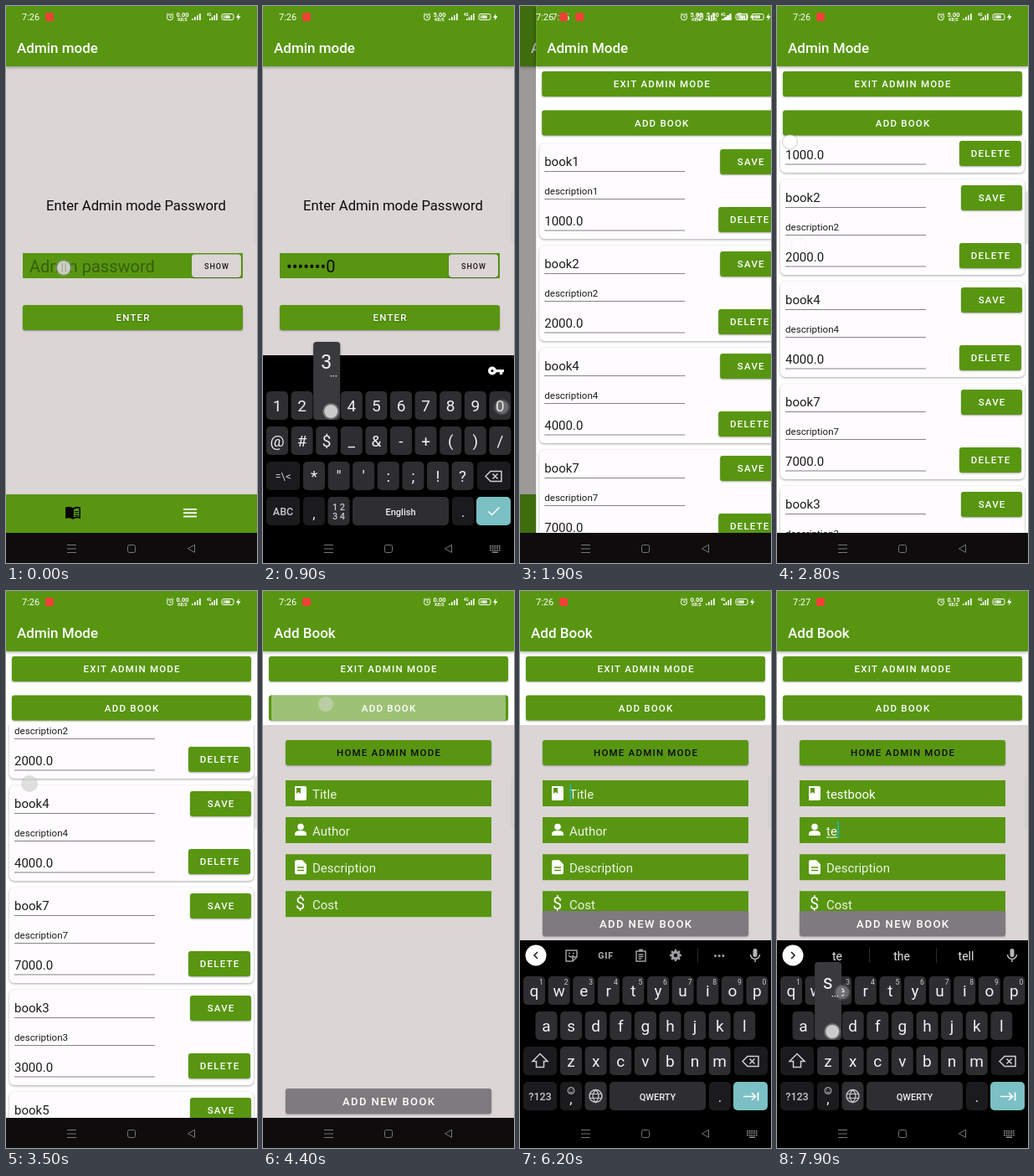
Animation of 300 by 665 pixels, one loop 8000 ms. Source, as an HTML page with a canvas:

```html
<!DOCTYPE html>
<html lang="en">
<head>
<meta charset="utf-8">
<title>Admin app</title>
<style>
html, body { margin: 0; width: 100%; height: 100%; overflow: hidden; background: #000; }
canvas { display: block; width: 300px; height: 665px; }
</style>
</head>
<body>
<canvas id="stage" width="300" height="665"></canvas>
<script>
const c = document.getElementById('stage').getContext('2d');
const LOOP = 8000, GREEN = '#589611', PAPER = '#dbd5d5', KEY = '#2e2e31', DARK = '#1b1b1d', TEAL = '#7ac0c4';
const SECRET = 'admin2003', TITLE = 'testbook', AUTHOR = 'tes';
const clamp = v => Math.max(0, Math.min(1, v));
const easeOut = v => 1 - (1 - clamp(v)) ** 3;

function box(x, y, w, h, fill, r = 0) {
  c.fillStyle = fill;
  c.beginPath();
  c.roundRect(x, y, w, h, r);
  c.fill();
}
function disc(x, y, r, fill) {
  c.fillStyle = fill;
  c.beginPath();
  c.arc(x, y, r, 0, 7);
  c.fill();
}
function ring(x, y, r, color, width = 1) {
  c.strokeStyle = color;
  c.lineWidth = width;
  c.beginPath();
  c.arc(x, y, r, 0, 7);
  c.stroke();
}
function shape(d, color, width = 0, x = 0, y = 0) {
  c.save();
  c.translate(x, y);
  if (width) {
    c.strokeStyle = color;
    c.lineWidth = width;
    c.stroke(new Path2D(d));
  } else {
    c.fillStyle = color;
    c.fill(new Path2D(d), 'evenodd');
  }
  c.restore();
}
function text(s, x, y, size, color, { align = 'left', weight = 400, gap = 0 } = {}) {
  c.font = `${weight} ${size}px Roboto, sans-serif`;
  c.letterSpacing = gap + 'px';
  c.textAlign = align;
  c.fillStyle = color;
  c.fillText(s, x, y);
  return c.measureText(s).width;
}
function shadowed(draw, blur = 2, alpha = 0.35) {
  c.save();
  c.shadowColor = `rgba(0,0,0,${alpha})`;
  c.shadowBlur = blur;
  c.shadowOffsetY = 1;
  draw();
  c.restore();
}
function button(label, x, y, w, { fill = GREEN, color = '#fff', size = 11.5, gap = 1.2 } = {}) {
  shadowed(() => box(x, y, w, 30, fill, 3));
  text(label, x + w / 2 + gap / 2, y + 15 + size * 0.36, size, color, { align: 'center', weight: 500, gap });
}
function touch(x, y, alpha = 1) {
  c.save();
  c.globalAlpha = alpha;
  disc(x, y, 10, 'rgba(160,160,160,.55)');
  disc(x, y, 8, 'rgba(226,224,224,.9)');
  c.restore();
}

function statusBar(t) {
  const speed = t < 300 ? '0.00' : t < 3500 ? '5.00' : t < 7000 ? '0.00' : '0.15';
  text(t < 6600 ? '7:26' : '7:27', 19, 17, 11, '#fff');
  box(47, 8, 10, 10, '#ee4136', 2);
  ring(196, 13.3, 3.6, '#fff');
  shape('M196 11v2.6h2M191.800 10.400l2-1.800M200.200 10.400l-2-1.800', '#fff', 0.9);
  text(speed, 211, 13, 7.5, '#fff', { align: 'center', weight: 700 });
  text('KB/S', 211, 18, 5, '#fff', { align: 'center', weight: 700 });
  for (let i = 0; i < 4; i++) {
    box(222 + i * 3, 15 - i * 2, 1.7, 2 + i * 2, '#fff');
    box(243 + i * 2.7, 15 - i * 2, 1.6, 2 + i * 2, '#fff');
  }
  text('4G', 240, 12, 4.5, '#fff', { weight: 700 });
  c.strokeStyle = '#fff';
  c.lineWidth = 1;
  c.beginPath();
  c.roundRect(258, 9.5, 14, 7, 2);
  c.stroke();
  box(259.500, 11, 8, 4, 'rgba(255,255,255,.55)');
  text('84', 265, 15, 5, '#fff', { align: 'center', weight: 700 });
  shape('M278.500 8.500l-3.500 5.500h2.500l-1 3.800 4-5.600h-2.600z', '#fff');
}
function header(title, t) {
  shadowed(() => box(0, 0, 300, 72, GREEN), 4, 0.4);
  text(title, 13, 56, 17, '#fff', { weight: 500 });
  statusBar(t);
}
function navBar(keyboardOpen) {
  box(0, 629, 300, 36, keyboardOpen ? '#000' : '#0e0c0d');
  shape('M73 643.500h11M73 648h11M73 652.500h11M217.500 647.800l8-4.600v9.200z', '#77777a', 1);
  c.beginPath();
  c.roundRect(145.500, 643.500, 9, 9, 2);
  c.strokeStyle = '#77777a';
  c.stroke();
  if (keyboardOpen) {
    for (let row = 0; row < 3; row++)
      for (let i = 0; i < 5; i++) box(271 + i * 2.7, 644 + row * 2.500, 1.8, 1.600, '#8a8a8d');
    box(274, 651.500, 7, 1.500, '#8a8a8d');
  }
}
function edgeHandle() {
  box(296, 221, 6, 63, 'rgba(205,203,206,.5)', 3);
}

const letterRows = ['qwertyuiop', 'asdfghjkl', 'zxcvbnm'];
const symbolRows = ['1234567890', '@#$_&-+()/', '*"\':;!?'];
const rowTop = r => 460 + r * 42;

function keySpots(rows) {
  const spots = {};
  rows.forEach((row, r) => {
    const start = r === 2 ? 61 : row.length === 9 ? 31.5 : 17;
    [...row].forEach((ch, i) => spots[ch] = { x: start + i * 29.6, y: rowTop(r), hint: r === 0 ? (i + 1) % 10 : '' });
  });
  return spots;
}
const letters = keySpots(letterRows), symbols = keySpots(symbolRows);
const mid = { align: 'center' };

function strip(kind, word) {
  if (kind === 'secret') {
    ring(274, 435.500, 3.3, '#fff', 3.400);
    box(277, 434, 11, 3.200, '#fff');
    box(283, 435, 3.200, 5, '#fff');
    return;
  }
  disc(19, 435, 12.5, '#fff');
  shape(word ? 'M17 431l4 4-4 4' : 'M21 431l-4 4 4 4', '#222', 1.6);
  box(278.500, 427, 5, 10, '#b5b5b8', 2.500);
  shape('M275.500 434a5.500 5.500 0 0 0 11 0M281 439.500v3.500', '#b5b5b8', 1.5);
  if (word) {
    const next = word.startsWith('tes') ? ['test', 'testing'] : ['the', 'tell'];
    [word, ...next].forEach((s, i) => text(s, 72 + i * 77, 440.500, 14, '#e4e4e6', mid));
    box(110, 426, 1, 18, '#2c2c2e');
    box(190, 426, 1, 18, '#2c2c2e');
    return;
  }
  const grey = '#a0a0a3';
  shape('M55 429h13v8l-5 5h-8zM68 437h-5v5M58 435q3 4 6 0', grey, 1.5);
  disc(59, 432.500, 1, grey);
  disc(64, 432.500, 1, grey);
  text('GIF', 102.500, 439, 10.5, grey, { align: 'center', weight: 900, gap: 0.8 });
  shape('M139 430h11v12h-11zM141.500 434h6M141.500 436.500h6M141.500 439h4', grey, 1.5);
  box(142, 427.500, 5, 3, grey, 1);
  ring(186, 435, 3.8, grey, 3);
  for (let i = 0; i < 8; i++) {
    const a = i * Math.PI / 4;
    disc(186 + 5.800 * Math.cos(a), 435 + 5.800 * Math.sin(a), 1.4, grey);
  }
  box(212, 426, 1, 18, '#2c2c2e');
  for (let i = 0; i < 3; i++) disc(233.500 + i * 4.700, 435.500, 1.5, grey);
}

function keyboard(kind, { useSymbols = false, press = '', last = '', word = '', drop = 0 } = {}) {
  const spots = useSymbols ? symbols : letters;
  c.save();
  c.beginPath();
  c.rect(0, 360, 300, 269);
  c.clip();
  c.translate(0, drop);
  box(0, 417, 300, 212, '#000');
  strip(kind, word);
  for (const [ch, k] of Object.entries(spots)) {
    box(k.x - 13, k.y, 26, 34, KEY, 5);
    text(ch, k.x, k.y + 24, 19, '#f0f0f2', mid);
    if (!useSymbols && k.hint !== '') text(k.hint, k.x + 8.500, k.y + 10, 8.5, '#d0d0d2', mid);
  }
  box(4, 544, 40, 34, DARK, 5);
  if (useSymbols) text('=\\<', 24, 566, 13, '#c8c8ca', mid);
  else shape('M24 552.500l9 9h-4.500v7h-9v-7H15z', '#d0d0d2', 1.5);
  box(256, 544, 40, 34, DARK, 5);
  shape('M272 555.500h13v12h-13l-6-6zM274.500 558.500l6 6M280.500 558.500l-6 6', '#d0d0d2', 1.5);
  box(4, 586, 40, 34, DARK, 5);
  text(useSymbols ? 'ABC' : '?123', 24, 608, 12.5, '#c8c8ca', { align: 'center', weight: 500 });
  for (const x of [61, 90.500, 239]) box(x - 13, 586, 26, 34, useSymbols && x !== 90.500 ? DARK : x === 90.500 ? KEY : DARK, 5);
  text(',', 61, 612, 17, '#f0f0f2', mid);
  text('.', 239, 610, 17, '#f0f0f2', mid);
  if (useSymbols) {
    text('1 2', 90.500, 602, 11, '#c8c8ca', { align: 'center', weight: 500 });
    text('3 4', 90.500, 613, 11, '#c8c8ca', { align: 'center', weight: 500 });
  } else {
    ring(61, 596.500, 4, '#c8c8ca');
    shape('M58.800 597.500q2.200 3 4.400 0M59.500 594.500v1.200M62.500 594.500v1.200', '#c8c8ca', 0.9);
    ring(90.500, 603, 7.500, '#c8c8ca', 1.4);
    shape('M83.500 600.500h14M83.500 605.500h14M90.500 595.500q-7 7.500 0 15q7-7.500 0-15', '#c8c8ca', 1.2);
  }
  box(107, 586, 115, 34, KEY, 5);
  text(useSymbols ? 'English' : 'QWERTY', 164.500, 607.500, 11, '#f0f0f2', { align: 'center', weight: 500 });
  box(255, 586, 41, 34, press === 'next' ? '#a3d4d7' : TEAL, 5);
  if (kind === 'secret') shape('M269.500 603.500l4 4 9-9', '#fff', 1.5);
  else shape('M267 603.500h14M277 599l4.500 4.500-4.500 4.500M284.500 598.500v10', '#fff', 1.7);

  const old = spots[last], k = spots[press];
  if (k) {
    shadowed(() => box(k.x - 16, k.y - 59, 32, 93, '#3a393c', 4), 3);
    text(press, k.x - 0.5, k.y - 27, 23, '#f4f4f6', mid);
    for (let i = 0; i < 3; i++) box(k.x + 4.500 + i * 3, k.y - 19, 1.500, 1.500, '#d8d8da');
  }
  if (old && last !== press) touch(old.x + 2, old.y + 19, 0.3);
  if (k) touch(k.x + 5, k.y + 24, 0.9);
  if (press === 'next') touch(276, 604, 0.7);
  c.restore();
}

function loginScreen(t) {
  box(0, 0, 300, 665, PAPER);
  header('Admin mode', t);
  edgeHandle();
  text('Enter Admin mode Password', 155.500, 244, 16.65, '#0c0c0c', mid);
  box(20, 295, 263, 30, GREEN);
  const typed = t < 100 ? 0 : Math.min(9, (t - 100) / 100);
  if (typed) {
    const shown = '•'.repeat(typed - 1) + SECRET[typed - 1];
    const w = text(shown, 28, 318, 20, '#0a0a0a');
    if (t === 1000 || t >= 1400) box(28 + w, 297, 1.700, 26, '#1fab7c');
  } else text('Admin password', 28, 318, 20, '#375e0c');
  shadowed(() => box(222, 296.500, 59, 27.500, PAPER, 4), 1.5);
  text('SHOW', 252, 314, 9, '#161616', { align: 'center', weight: 500, gap: 1 });
  const ripple = t === 1500 ? '#6fa42f' : t >= 1600 ? '#82b04b' : GREEN;
  shadowed(() => button('ENTER', 20, 357, 263, { fill: ripple, size: 11.5 }), t >= 1500 ? 7 : 2);
  box(0, 583, 300, 46, GREEN);
  shape('M71 598.500q5-2 9 .8q4-2.800 9-.8v13.500q-5-2-9 .8q-4-2.800-9-.8zM81 601v9.500q3-1.500 6.500-.8v-9.700q-3.500-.6-6.500 1z', '#050505');
  shape('M82 603.500h4.500M82 606h4.500M82 608.500h4.500', '#050505', 1);
  for (const y of [600, 604.300, 608.600]) box(212, y, 16, 1.800, '#fff');

  const open = t >= 100 && t < 1100;
  if (open) {
    const n = Math.floor(typed), usable = t >= 200 && t < 1000;
    keyboard('secret', {
      useSymbols: n >= 5,
      press: usable ? SECRET[n] : '',
      last: usable && n ? SECRET[n - 1] : '',
      drop: t === 100 ? 90 : 0
    });
  }
  navBar(open);
  if (t < 100) {
    touch(69, 312.500, 0.9);
    box(66.500, 307, 1.500, 11, 'rgba(120,130,110,.4)');
    box(70.500, 307, 1.500, 11, 'rgba(120,130,110,.4)');
  }
  if (t === 1400 || t === 1500) touch(57, 379, 0.7);
  if (t === 1600) disc(57, 379, 9, 'rgba(146,190,80,.8)');
}

function topButtons() {
  box(0, 72, 300, 88, '#fff');
  button('EXIT ADMIN MODE', 7, 78, 286);
  button('ADD BOOK', 7, 124.500, 286);
}
function bookCard(n, y) {
  shadowed(() => box(4, y, 292, 114, '#fefcfe', 6), 3, 0.35);
  text('book' + n, 10, y + 27, 15, '#1c1c1c');
  text('description' + n, 10, y + 61, 11.6, '#1c1c1c');
  text(n + '000.0', 10, y + 98, 15, '#1c1c1c');
  for (const dy of [33, 66, 103.500]) box(10, y + dy, 168, 1, '#858385');
  button('SAVE', 220, y + 7, 73);
  button('DELETE', 218, y + 76, 74);
}
function scrollAt(t) {
  if (t < 2600) return 0;
  if (t <= 2800) return 79 * ((t - 2500) / 300) ** 1.3;
  if (t < 3500) return 79 + 225 * easeOut((t - 2800) / 700);
  return 304 * (1 - easeOut((t - 3400) / 600));
}
function listScreen(t) {
  box(0, 0, 300, 665, '#fff');
  c.save();
  c.beginPath();
  c.rect(0, 157, 300, 472);
  c.clip();
  const scroll = scrollAt(t);
  [1, 2, 4, 7, 3, 5, 6].forEach((n, i) => bookCard(n, 164 + i * 122 - scroll));
  c.restore();
  topButtons();
  header('Admin Mode', t);
  edgeHandle();
  navBar(false);
  if (t >= 2600 && t < 2800) touch(24, 286 - (t - 2600) * 0.62, 0.6);
  if (t === 2800) {
    ring(15.500, 162, 9, 'rgba(150,150,150,.45)');
    disc(15.500, 162, 8, 'rgba(255,255,255,.7)');
    ring(26, 286, 9, 'rgba(150,150,150,.1)');
  }
  if (t >= 3500 && t < 3700) touch(28, 230 + (t - 3500), 0.6);
  if (t === 4300) touch(75, 135, 0.7);
}

function fieldIcon(i, y) {
  if (i === 0) shape('M38 -8h12a2 2 0 0 1 2 2v13a2 2 0 0 1-2 2h-12zM40 -6v7l2.500-2 2.500 2v-7z', '#fff', 0, 0, y);
  if (i === 1) {
    disc(45, y - 3.500, 3.800, '#fff');
    shape('M38 7v-2q0-4 7-4t7 4v2z', '#fff', 0, 0, y);
  }
  if (i === 2) shape('M40 -8h7l5 5v10a2 2 0 0 1-2 2h-10a2 2 0 0 1-2-2v-13a2 2 0 0 1 2-2zM41 0v1.600h8v-1.600zM41 3.500v1.600h8v-1.600z', '#fff', 0, 0, y);
  if (i === 3) text('$', 44.500, y + 7, 20, '#fff', mid);
}
function addScreen(t) {
  box(0, 0, 300, 665, PAPER);
  topButtons();
  header('Add Book', t);
  edgeHandle();
  if (t < 4800) {
    c.save();
    c.globalAlpha = clamp((4800 - t) / 400);
    box(10, 124.500, 280, 30, 'rgba(255,255,255,.42)', 2);
    disc(75, 135, 9, 'rgba(205,213,196,.6)');
    c.restore();
  }
  button('HOME ADMIN MODE', 27, 178, 246, { color: '#0b0b0b' });

  const titleText = TITLE.slice(0, Math.max(0, (t - 6600) / 100));
  const authorText = AUTHOR.slice(0, Math.max(0, (t - 7700) / 100));
  const values = [titleText, authorText, '', ''];
  const focus = t < 5100 ? -1 : t < 7500 ? 0 : 1;
  const caretOn = t >= 6200 || t < 5500 || (t >= 5700 && t < 6000);
  ['Title', 'Author', 'Description', 'Cost'].forEach((hint, i) => {
    const y = 226 + i * 44.1;
    box(27, y, 246, 31, GREEN);
    fieldIcon(i, y + 15);
    const w = text(values[i] || hint, 59, y + 22, 15, values[i] ? '#fff' : '#eef3e4');
    if (i !== focus) return;
    const end = 59 + (values[i] ? w : 0);
    if (values[i]) box(59, y + 23.500, w, 1, '#fff');
    if (caretOn) box(end + 0.5, y + 5, 1.700, 20, '#1fb4b8');
  });
  const rise = easeOut((t - 5100) / 400), open = t >= 5200;
  const addY = 594 - 212 * rise;
  button('ADD NEW BOOK', 27, addY, 246, { fill: '#7f7a7e', size: 13, gap: 1.4 });
  if (open) {
    const titling = t >= 6600 && t < 7400;
    const press = titling ? TITLE[(t - 6600) / 100] : t === 7400 ? 'next' : t >= 7700 ? AUTHOR[(t - 7700) / 100] : '';
    const last = titling ? TITLE[(t - 6700) / 100] : t > 7700 ? AUTHOR[(t - 7800) / 100] : '';
    keyboard('text', { press, last, word: t < 7500 ? titleText : authorText, drop: 212 * (1 - rise) });
  }
  navBar(open);
  if (t === 5000 || t === 5100) touch(86, 243, t === 5000 ? 0.8 : 0.4);
}

function draw(t) {
  c.clearRect(0, 0, 300, 665);
  if (t < 1700) loginScreen(t);
  else if (t < 2100) {
    const enter = easeOut((t - 1600) / 500);
    loginScreen(t);
    box(0, 0, 300, 629, `rgba(0,0,0,${0.3 * enter})`);
    c.save();
    c.translate(300 * (1 - enter), 0);
    listScreen(t);
    c.restore();
    navBar(false);
    statusBar(t);
  } else if (t < 4400) listScreen(t);
  else addScreen(t);
}

function tick() {
  draw(Math.floor(performance.now() % LOOP / 100) * 100);
  requestAnimationFrame(tick);
}
tick();
</script>
</body>
</html>
```
